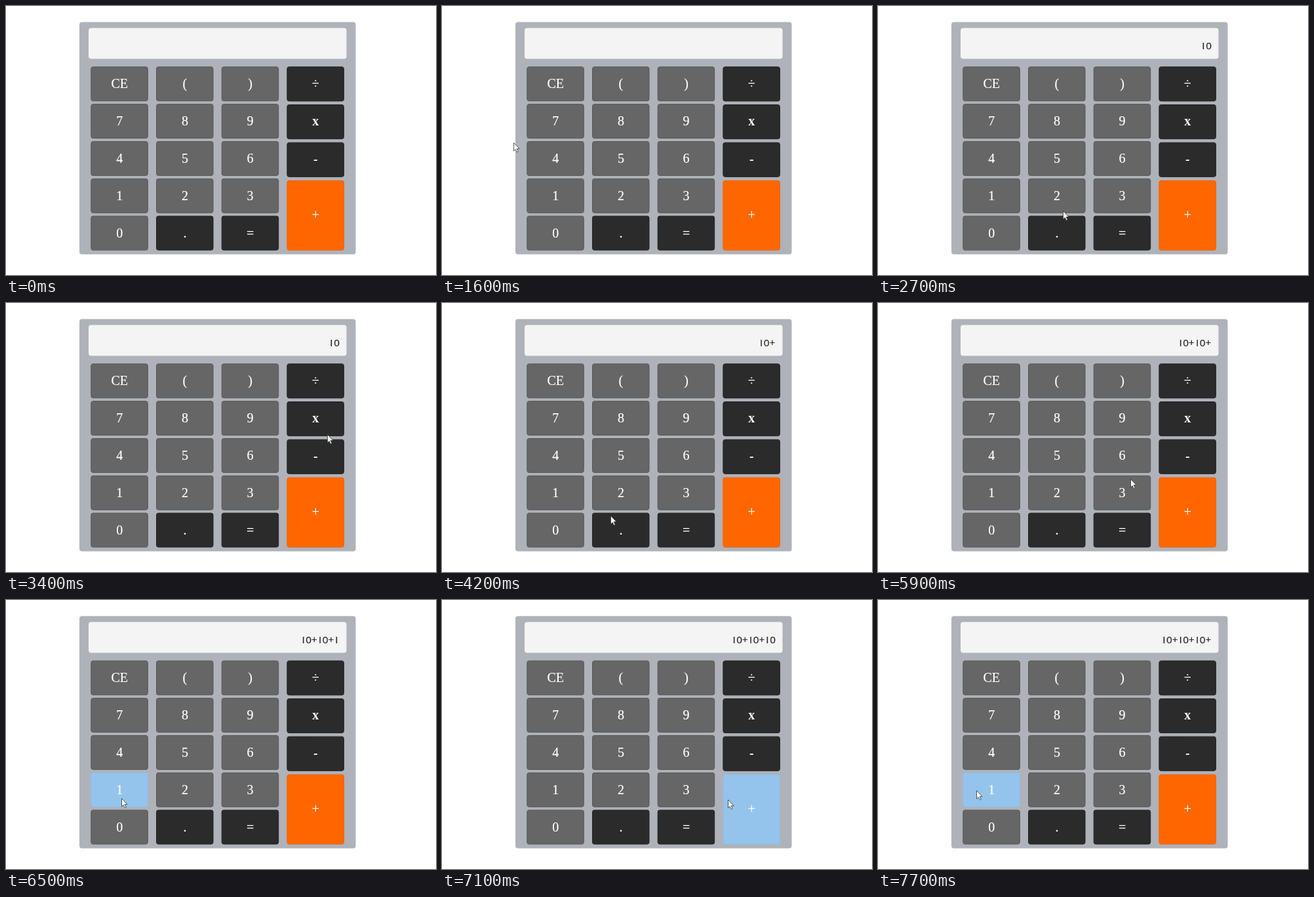
Animation of 656x410 px, one loop 8000 ms. Source, as an HTML page:

```html
<!DOCTYPE html>
<html lang="en">
<head>
<meta charset="utf-8">
<title>Calculator</title>
<style>
  html, body { margin: 0; width: 100%; height: 100%; overflow: hidden; background: #fff; }
  svg { display: block; width: 656px; height: 410px; }
  .key rect { stroke-width: 1; }
  .key text { font: 20px "Liberation Serif", "Times New Roman", serif; fill: #fff; stroke: #fff; stroke-width: .2; text-anchor: middle; }
  .gray rect { fill: #666; stroke: #575757; }
  .dark rect { fill: #2b2b2b; stroke: #222; }
  .plus rect { fill: #ff6600; stroke: #f06204; }
  .key.hover rect { fill: #94c4eb; stroke: #8fbfe6; }
  .bold text { font-weight: bold; stroke: none; }
  #out { font: 15.3px "Open Sans", "Noto Sans", sans-serif; fill: #222; stroke: #222; stroke-width: .2; text-anchor: middle; }
</style>
</head>
<body>
<svg viewBox="0 0 656 410">
  <rect x="112" y="24.5" width="421.5" height="354" rx="4" fill="#afb2b9"/>
  <rect x="126" y="33.5" width="393.5" height="47" rx="4" fill="#f4f4f4"/>
  <text id="out" y="65.5"></text>
  <g id="keys"></g>
  <g id="cursor">
    <path id="arrow" d="M.5 .5V13L3.2 10.4L5.2 14.8L7.2 13.9L5.2 9.6H9Z" fill="#fff" stroke="#333" stroke-width=".8"/>
    <path id="beam" d="M-2.5 -6H-.6L0 -5.4L.6 -6H2.5M0 -5.4V5.4M-2.5 6H-.6L0 5.4L.6 6H2.5" fill="none" stroke="#456" stroke-width="1"/>
  </g>
</svg>
<script>
const NS = "http://www.w3.org/2000/svg";
const $ = id => document.getElementById(id);
const keys = {};

function add(parent, tag, attrs) {
  const el = document.createElementNS(NS, tag);
  for (const name in attrs) el.setAttribute(name, attrs[name]);
  return parent.appendChild(el);
}

function addKey(label, look, x, y, h, drop) {
  const g = add($("keys"), "g", { class: "key " + look });
  add(g, "rect", { x: x + .5, y: y + .5, width: 86.5, height: h - 1, rx: 3 });
  const cx = x + 43.9, cy = y + h / 2;
  add(g, "text", { x: cx, y: cy + drop }).textContent = label;
  keys[label] = { g, cx, cy };
}

["CE()", "789", "456", "123", "0.="].forEach((row, r) => {
  const labels = r ? [...row] : ["CE", "(", ")"];
  labels.forEach((label, c) =>
    addKey(label, ".=".includes(label) ? "dark" : "gray", 129.3 + c * 99.7, 92.3 + r * 56.85, 52.9, 6.4));
});
["÷", "x", "-"].forEach((label, r) =>
  addKey(label, label === "÷" ? "dark" : "dark bold", 428.4, 92.3 + r * 57.7, 53.1, 5.7));
addKey("+", "plus", 428.4, 265.7, 106.9, 5.9);

// time in tenths of a second, pointer x, y, hovered key
const path = [
  [9, 0, 172], [10, 60, 167], [11, 111, 190], [15, 111, 190], [16, 109, 208],
  [17, 98, 230], [20, 165, 296, "1"], [22, 172, 302, "1"], [23, 176, 318],
  [24, 179, 339, "0"], [25, 184, 338, "0"], [26, 220, 328], [27, 282, 312],
  [29, 425, 250], [33, 504, 180], [34, 490, 200], [35, 447, 229],
  [36, 450, 272, "+"], [38, 456, 303, "+"], [40, 445, 305], [41, 360, 318],
  [42, 257, 324], [43, 190, 312, "1"], [45, 176, 302, "1"], [47, 176, 305, "1"],
  [48, 179, 339, "0"], [51, 179, 339, "0"], [52, 235, 328], [54, 436, 304, "+"],
  [55, 458, 303, "+"], [58, 445, 300], [59, 385, 268], [60, 270, 295],
  [62, 185, 303, "1"], [65, 176, 302, "1"], [66, 179, 339, "0"],
  [69, 235, 328], [71, 436, 304, "+"], [73, 458, 303, "+"],
  [74, 390, 308], [76, 192, 296, "1"], [77, 150, 290, "1"], [80, 150, 290]
];
const clicks = { 22: "1", 25: "0", 40: "+", 47: "1", 51: "0", 58: "+", 65: "1", 68: "0", 73: "+" };

// the display face draws "1" as a plain stroke
function show(text) {
  let x = 508.5;
  const xs = [...text].reverse().map(ch => {
    const w = ch === "+" ? 9.4 : 8;
    x -= w;
    return x + w / 2;
  }).reverse();
  $("out").setAttribute("x", xs.join(" "));
  $("out").textContent = text.replace(/1/g, "I");
}

function draw(t) {
  const i = path.findIndex((p, n) => path[n + 1] && p[0] <= t && t < path[n + 1][0]);
  $("cursor").style.display = i < 0 ? "none" : "";
  let hover;
  if (i >= 0) {
    const [t0, x0, y0, label] = path[i], [t1, x1, y1] = path[i + 1];
    const k = (t - t0) / (t1 - t0);
    const x = x0 + (x1 - x0) * k, y = y0 + (y1 - y0) * k;
    hover = keys[label];
    const overText = hover && Math.abs(x - hover.cx) < 8 && Math.abs(y - hover.cy) < 9;
    $("cursor").setAttribute("transform", `translate(${x} ${y})`);
    $("arrow").style.display = overText ? "none" : "";
    $("beam").style.display = overText ? "" : "none";
  }
  for (const key of Object.values(keys)) key.g.classList.toggle("hover", key === hover);
  show(Object.keys(clicks).filter(at => at <= t).map(at => clicks[at]).join(""));
}

const start = performance.now();
let last = -1;
function tick() {
  const t = Math.floor((performance.now() - start) % 8000 / 100);
  if (t !== last) draw(last = t);
  requestAnimationFrame(tick);
}
tick();
</script>
</body>
</html>
```
